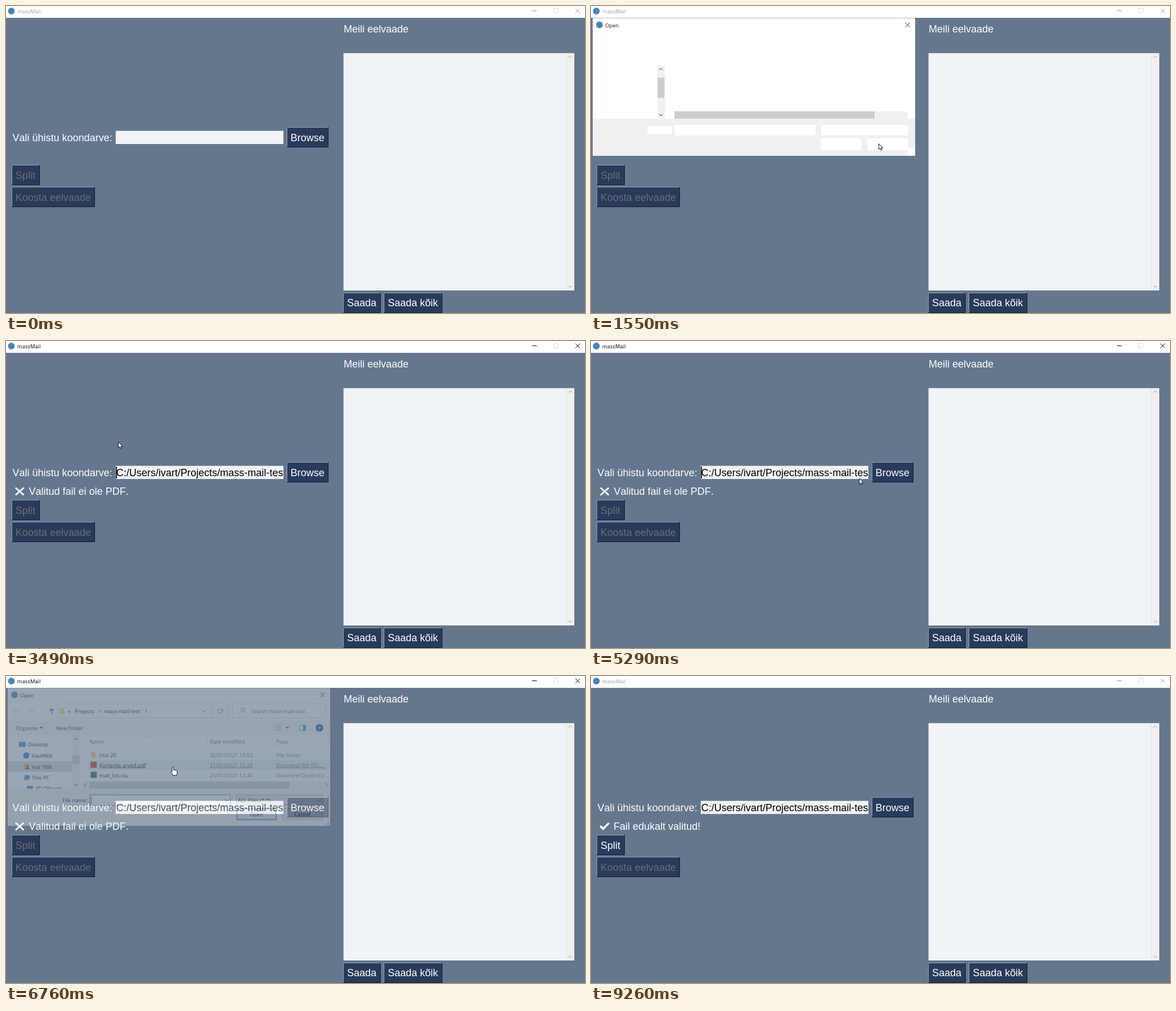
These frames come from a looping animation (1027x545 px, 9330 ms). An HTML page:

```html
<!DOCTYPE html>
<html lang="et">
<head>
<meta charset="utf-8">
<title>massMail</title>
<style>
html, body { margin: 0; height: 100%; overflow: hidden; background: #64778d; }
svg { display: block; width: 100vw; height: 100vh; }
text { white-space: pre; }
.form { font: 18px "Liberation Sans", Arial, sans-serif; font-kerning: none; fill: #fff; }
.ui { font: 9.4px "Open Sans", "Noto Sans", sans-serif; fill: #111; }
.grey { fill: #6d6d6d; }
.head { fill: #4c607a; }
.line { fill: none; stroke: currentColor; }

/* Every part shares one loop with hard changes. */
.titlebar, .dialog, .full, .rows, .msg-bad, .msg-ok, .path, .caret, .split,
.on-pdf, .on-csv, .on-combo, .on-cancel, .mouse, .arrow, .hand {
  animation: 9.33s step-end infinite;
}
.titlebar { animation-name: titlebar; }
.dialog { animation-name: dialog; }
.full { animation-name: full; }
.rows { animation-name: rows; }
.msg-bad { animation-name: msg-bad; }
.msg-ok { animation-name: msg-ok; }
.path { animation-name: path; }
.caret { animation-name: caret; }
.split { animation-name: split; }
.on-pdf { animation-name: on-pdf; }
.on-csv { animation-name: on-csv; }
.on-combo { animation-name: on-combo; }
.on-cancel { animation-name: on-cancel; }
.mouse { animation-name: move, present; }
.arrow { animation-name: arrow; }
.hand { animation-name: hand; }

@keyframes titlebar {
  0%, 12.11%, 57.66%, 99.24%, 100% { color: #999; }
  11.25%, 31.72%, 71.59% { color: #000; }
}
@keyframes dialog {
  0%, 34.29%, 74.16%, 100% { opacity: 0; }
  16.61%, 59.16% { opacity: 1; }
  31.72%, 71.59% { opacity: .75; }
  32.58%, 72.45% { opacity: .35; }
  33.44%, 73.31% { opacity: .08; }
}
@keyframes full {
  0%, 38%, 100% { opacity: 0; }
  17.57%, 60.12% { opacity: 1; }
}
@keyframes rows {
  0%, 38%, 100% { opacity: 0; }
  18.32%, 61.09% { opacity: 1; }
}
@keyframes msg-bad {
  0%, 77.49%, 100% { opacity: 0; }
  37.4% { opacity: 1; }
}
@keyframes msg-ok {
  0% { opacity: 0; }
  77.49%, 100% { opacity: 1; }
}
@keyframes path {
  0% { opacity: 0; }
  37.4%, 100% { opacity: 1; }
}
@keyframes caret {
  0%, 40.08%, 49.94%, 57.66%, 79.95%, 89.81%, 99.24%, 100% { opacity: 0; }
  37.4%, 43.4%, 53.05%, 74.16%, 83.38%, 93.03% { opacity: 1; }
}
@keyframes split {
  0% { fill: #6d6d6d; }
  77.49%, 100% { fill: #fff; }
}
@keyframes on-pdf {
  0%, 25.83%, 75%, 100% { opacity: 0; }
  24.97%, 65.91% { opacity: 1; }
}
@keyframes on-csv {
  0%, 24.97%, 38%, 65.91%, 100% { opacity: 0; }
  24.14%, 25.83%, 65.05% { opacity: 1; }
}
@keyframes on-combo {
  0%, 21.67%, 64.3%, 100% { opacity: 0; }
  20.83%, 63.45% { opacity: 1; }
}
@keyframes on-cancel {
  0%, 20%, 62.59%, 100% { opacity: 0; }
  17.57%, 60.12% { opacity: 1; }
}
@keyframes present {
  0%, 94.96%, 100% { opacity: 0; }
  3.1% { opacity: 1; }
}
@keyframes arrow {
  0%, 37.4%, 77.49%, 100% { opacity: 1; }
  24.14%, 65.05% { opacity: 0; }
}
@keyframes hand {
  0%, 37.4%, 77.49%, 100% { opacity: 0; }
  24.14%, 65.05% { opacity: 1; }
}
@keyframes move {
  0% { transform: translate(920px, 538px); }
  3.1% { transform: translate(920px, 538px); animation-timing-function: steps(4); }
  6.43% { transform: translate(760px, 430px); animation-timing-function: steps(4); }
  9.64% { transform: translate(540px, 268px); animation-timing-function: steps(2); }
  11.25% { transform: translate(510px, 244px); }
  19.18% { transform: translate(510px, 244px); animation-timing-function: steps(7); }
  24.97% { transform: translate(218px, 165px); }
  25.83% { transform: translate(212px, 175px); }
  26.68% { transform: translate(204px, 178px); }
  27.43% { transform: translate(200px, 179px); }
  29.26% { transform: translate(199px, 179px); }
  45.87% { transform: translate(199px, 187px); }
  46.73% { transform: translate(198px, 215px); }
  47.48% { transform: translate(193px, 252px); }
  48.33% { transform: translate(191px, 269px); }
  49.08% { transform: translate(191px, 269px); animation-timing-function: steps(9); }
  56.8% { transform: translate(511px, 240px); }
  62.59% { transform: translate(492px, 234px); }
  63.45% { transform: translate(466px, 222px); }
  64.3% { transform: translate(405px, 198px); }
  65.05% { transform: translate(335px, 174px); }
  65.91% { transform: translate(296px, 161px); }
  85.85% { transform: translate(300px, 161px); }
  86.7% { transform: translate(303px, 161px); }
  87.45% { transform: translate(303px, 161px); animation-timing-function: steps(3); }
  90.03% { transform: translate(430px, 240px); animation-timing-function: steps(3); }
  92.6% { transform: translate(800px, 450px); animation-timing-function: steps(2); }
  94.1%, 100% { transform: translate(943px, 523px); }
}
</style>
</head>
<body>
<svg viewBox="0 0 1027 545" preserveAspectRatio="none">
  <defs>
    <clipPath id="entry"><rect x="195" y="222" width="296.5" height="23"/></clipPath>
    <path id="down" class="line" d="M-3.2-1.6L0 1.6L3.2-1.6"/>
    <path id="up" class="line" d="M-3.2 1.6L0-1.6L3.2 1.6"/>
    <path id="right" class="line" d="M-1.3-2.6L1.3 0L-1.3 2.6"/>
    <path id="left" class="line" d="M1.6-3.2L-1.6 0L1.6 3.2"/>
    <path id="cross" class="line" d="M-4-4L4 4M4-4L-4 4"/>
    <path id="folder" fill="#ffd873" d="M0 0H4L5 1H8V11H0Z"/>
  </defs>
  <rect width="1027" height="545" fill="#64778d"/>

  <!-- title bar -->
  <rect width="1027" height="21" fill="#fff"/>
  <circle cx="9.5" cy="9" r="6" fill="#4585b5"/>
  <g class="titlebar ui">
    <text x="20" y="12.5" fill="currentColor">massMail</text>
    <path class="line" d="M933 8.5H941.5"/>
    <use href="#cross" x="1014" y="8.5"/>
  </g>
  <rect x="971.5" y="4.5" width="7.5" height="7.5" fill="none" stroke="#dcdcdc"/>

  <!-- form -->
  <path fill="#f0f3f7" d="M195 222H492V245H195ZM599 83.5H1008V505H599Z"/>
  <path class="line" color="#98a2ae" d="M194.5 245V221.5H492M598.5 505V83.5H1008"/>
  <rect x="994" y="84" width="14" height="421" fill="#f0f0f0"/>
  <path class="line" color="#e2e4e6" d="M993.5 84V505"/>
  <g color="#999"><use href="#up" x="1001" y="90"/><use href="#down" x="1001" y="498"/></g>

  <path fill="#283b5b" d="M498 215H572V251H498ZM10 282H60V318H10ZM10 321H157.5V357H10ZM598 509H664.5V545H598ZM670 509H774V545H670Z"/>
  <path class="line" color="#929fb0" d="M498.5 251V215.5H572M10.5 318V282.5H60M10.5 357V321.5H157.5M598.5 545V509.5H664.5M670.5 545V509.5H774"/>
  <path class="line" color="#111a2b" d="M498 250.5H571.5V215M10 317.5H59.5V282M10 356.5H157V321M598 544.5H664V509M670 544.5H773.5V509"/>

  <g class="form">
    <text x="598.9" y="46.5">Meili eelvaade</text>
    <text x="11.5" y="239.5">Vali ühistu koondarve:</text>
    <text x="504.8" y="239.5">Browse</text>
    <text class="split" x="17" y="306.5">Split</text>
    <text class="grey" x="16.7" y="346">Koosta eelvaade</text>
    <text x="605" y="533">Saada</text>
    <text x="677.2" y="533">Saada kõik</text>
    <g class="path" clip-path="url(#entry)"><text x="195.5" y="239.5" fill="#000">C:/Users/ivart/Projects/mass-mail-tes</text></g>
    <g class="msg-bad">
      <path class="line" color="#fff" stroke-width="2.8" d="M17 260.5L31.5 273.5M31.5 260.5L17 273.5"/>
      <text x="40.5" y="273">Valitud fail ei ole PDF.</text>
    </g>
    <g class="msg-ok">
      <path d="M15 267.5L18 265L21.5 268.8L30.5 260L33 262L21.5 274Z"/>
      <text x="40" y="273">Fail edukalt valitud!</text>
    </g>
  </g>
  <rect class="caret" x="195" y="223" width="1.6" height="21"/>

  <!-- file dialog -->
  <g class="dialog ui">
    <rect x="3" y="21.5" width="572" height="244.5" fill="#fff"/>
    <rect x="3" y="200" width="572" height="66" fill="#f0f0f0"/>
    <path fill="#f0f0f0" d="M118 105H131V200H118ZM148 187H561V200H148Z"/>
    <path fill="#cdcdcd" d="M118 127H130.5V163H118ZM148 187H503V200H148Z"/>
    <path fill="#fff" d="M100 213H144V227H100ZM148 211H398V230H148ZM408 211H562V229.5H408ZM408 235H480V256H408ZM490 235H562V256H490ZM561.5 252H575V266H561.5Z"/>
    <circle cx="15" cy="33.5" r="6" fill="#4585b5"/>
    <text x="25" y="37.5">Open</text>
    <g color="#222">
      <use href="#cross" x="561.5" y="33.5"/>
      <use href="#up" x="124" y="112"/>
      <use href="#down" x="124" y="193.5"/>
    </g>

    <g class="full">
      <!-- navigation -->
      <g class="line">
        <path stroke="#ccc" d="M24 62.5H14.5M18 58.5L14 62.5L18 66.5M39 62.5H48.5M45 58.5L49 62.5L45 66.5M61.5 61.5L64 64L66.5 61.5"/>
        <path stroke="#444" stroke-width="1.2" d="M81 68V58M77 62L81 58L85 62"/>
        <path stroke="#d9d9d9" d="M91.5 49.5H393.5V74.5H91.5ZM366.5 49.5V74.5M401.5 49.5H567V74.5H401.5Z"/>
        <path stroke="#555" d="M383 59.2A4.3 4.3 0 1 1 378.5 58M383.5 57.5V60.5H380.5"/>
        <g stroke="#777"><circle cx="420.5" cy="60" r="3.3"/><path d="M418 62.5L414 66.5"/></g>
      </g>
      <use href="#folder" x="95" y="56.5"/>
      <text x="110" y="65.5">«</text>
      <text x="122" y="65.5">Projects</text>
      <text x="174" y="65.5">mass-mail-test</text>
      <text x="435" y="65.5" class="grey">Search mass-mail-test</text>
      <g color="#444">
        <use href="#right" x="166" y="62"/><use href="#right" x="248" y="62"/>
        <use href="#down" x="352" y="62.5"/>
      </g>

      <!-- toolbar -->
      <rect x="3" y="79" width="572" height="26" fill="#f5f6f7"/>
      <g fill="#1e395b">
        <text x="17.5" y="95.5">Organise</text>
        <text x="89" y="95.5">New folder</text>
        <path d="M59.5 90.5H65.5L62.5 93.5ZM496 90.5H502L499 93.5Z"/>
      </g>
      <path class="line" color="#8a929c" d="M476 88H479M481 88H488M476 92H479M481 92H488M476 96H479M481 96H488"/>
      <rect x="520.5" y="87.5" width="11" height="9" fill="#fff" stroke="#7b98b3"/>
      <rect x="527" y="88" width="4.5" height="8.5" fill="#2d8fdd"/>
      <circle cx="556" cy="92" r="6.7" fill="#0063b1"/>
      <text x="556" y="95.5" fill="#fff" font-weight="bold" text-anchor="middle">?</text>

      <!-- folder tree -->
      <rect x="3" y="151" width="114" height="19" fill="#d9d9d9"/>
      <g fill="#2a93e0">
        <path d="M23 117H35V126H23ZM33 176H42V183H33ZM37 195H48V203H37Z"/>
        <circle cx="36" cy="141" r="5.5" fill="#0f78d4"/>
        <path fill="#8aa0b2" d="M31 182H40V185H31Z"/>
      </g>
      <path fill="#e5b65c" d="M32 155H38V166H32Z"/>
      <path fill="#4a6678" d="M34.5 166Q35 161.5 38 161.5T42 166Z"/>
      <circle cx="38.2" cy="159.5" r="2.2" fill="#8b664d"/>
      <text x="39" y="125">Desktop</text>
      <text x="45.5" y="144.5">VaultNib</text>
      <text x="45.5" y="164.5">Ivar Tõlk</text>
      <text x="45.5" y="184">This PC</text>
      <text x="52" y="203">3D Objects</text>
      <rect x="118" y="120" width="13" height="68" fill="#f0f0f0"/>
      <rect x="118" y="141" width="12.5" height="15" fill="#cdcdcd"/>

      <!-- file list -->
      <path class="line" color="#e5e5e5" d="M356.5 105V126M474.5 105V126M572.5 105V126"/>
      <g color="#888"><use href="#up" x="250" y="107"/></g>
      <g class="head">
        <text x="148" y="119.5">Name</text>
        <text x="361.5" y="119.5">Date modified</text>
        <text x="479" y="119.5">Type</text>
      </g>
      <g class="rows">
        <g class="on-pdf">
          <rect x="146" y="149" width="428" height="18" fill="#e5f3ff"/>
          <path class="line" color="#333" d="M166 163H248"/>
          <path class="line" color="#777" d="M361.5 163H437M479 163H567"/>
        </g>
        <g class="on-csv">
          <rect x="146" y="167" width="428" height="18" fill="#e5f3ff"/>
          <path class="line" color="#333" d="M166 181H216"/>
          <path class="line" color="#777" d="M361.5 181H437M479 181H567"/>
        </g>
        <use href="#folder" x="151" y="134.5"/>
        <rect x="150" y="152" width="11" height="11" fill="#d32f2f"/>
        <rect x="150" y="170" width="11" height="11" fill="#1f7145"/>
        <text x="165.5" y="144">Uus 20</text>
        <text x="165.5" y="161.5">Korterite arved.pdf</text>
        <text x="165.5" y="179.5">mail_list.csv</text>
        <g class="grey">
          <text x="361.5" y="144">26/01/2021 12:53</text>
          <text x="361.5" y="161.5">21/01/2021 12:38</text>
          <text x="361.5" y="179.5">25/01/2021 12:46</text>
          <text x="479" y="144">File folder</text>
          <text x="479" y="161.5">Dovantrel Rift PD...</text>
          <text x="479" y="179.5">Dovantrel Quoin Co...</text>
        </g>
      </g>
      <path fill="#f0f0f0" d="M134 187H148V200H134ZM561 187H574V200H561ZM3 200H575V266H3Z"/>
      <g color="#333">
        <use href="#left" x="140.5" y="193.5"/>
        <path class="line" d="M566.5 190.3L569.7 193.5L566.5 196.7"/>
      </g>

      <!-- file name and buttons -->
      <text x="100" y="224">File name:</text>
      <rect x="148.5" y="211" width="249.5" height="19" fill="#fff" stroke="#0078d7" stroke-width=".9"/>
      <rect x="150.5" y="214" width="1" height="13"/>
      <g stroke="#adadad" fill="#e1e1e1">
        <rect x="408.5" y="211" width="153" height="18"/>
        <rect x="490.5" y="235.5" width="70.5" height="19.5"/>
        <rect x="409.5" y="236" width="69.5" height="19" stroke="#0078d7" stroke-width="1.5"/>
      </g>
      <g stroke="#0078d7" fill="#e5f1fb" stroke-width=".9">
        <rect class="on-combo" x="408.5" y="211" width="153" height="18"/>
        <rect class="on-cancel" x="490.5" y="235.5" width="70.5" height="19.5"/>
      </g>
      <g color="#555"><use href="#down" x="391" y="220.5"/><use href="#down" x="555" y="220.5"/></g>
      <text x="411" y="223.5">ALL Files (*.*)</text>
      <g text-anchor="middle">
        <text x="444" y="249">Open</text>
        <text x="525.5" y="249">Cancel</text>
      </g>
      <path fill="#bbb" d="M571 258H573V260H571ZM568.5 260.5H570.5V262.5H568.5ZM571 260.5H573V262.5H571ZM566 263H568V265H566ZM568.5 263H570.5V265H568.5ZM571 263H573V265H571Z"/>
    </g>
  </g>

  <g class="mouse" fill="#fff" stroke="#000" stroke-width=".9" stroke-linejoin="round">
    <path class="arrow" d="M.4.5V10.8L2.7 8.7L4.3 12.4L6 11.7L4.4 8.1H7.6Z"/>
    <path class="hand" d="M-1.2 9V1.7A1.3 1.3 0 0 1 1.4 1.7V5.8Q3.5 5.2 3.7 6.4Q5.6 5.9 5.8 7.1Q7.6 6.9 7.6 8.3V11Q7.6 12.8 6.3 14.2V15.6H.2V14.4L-3.4 9.7Q-3.9 8-2.4 8.2Z"/>
  </g>
</svg>
</body>
</html>
```
